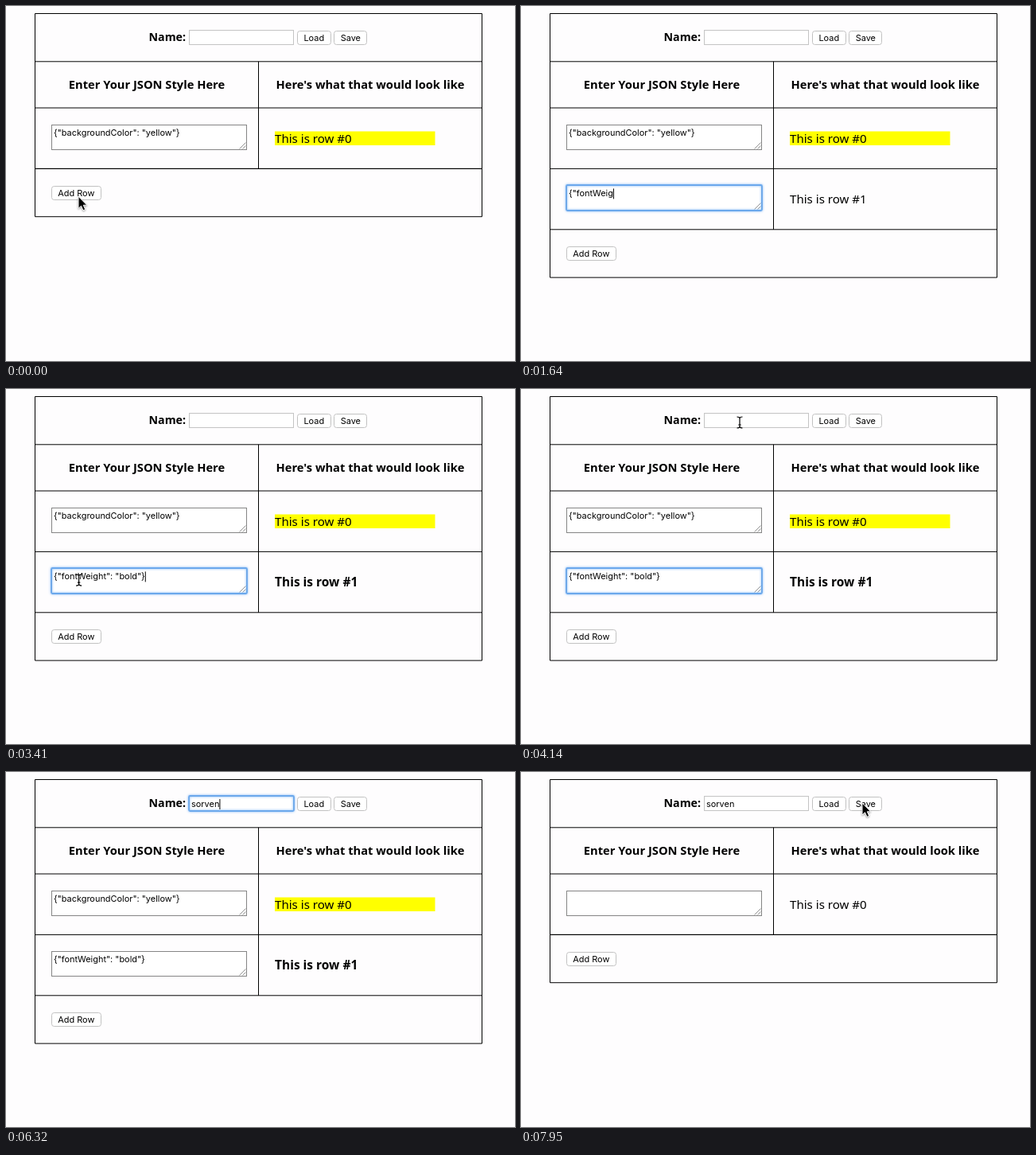
Recreate the animation shown at these times as an HTML page. Size 640x446 px, loop 8000 ms.

```html
<!DOCTYPE html>
<html lang="en">
<head>
<meta charset="utf-8">
<title>JSON style table</title>
<style>
  html, body { margin: 0; width: 100%; height: 100%; overflow: hidden; background: #fefdfe; }
  svg { display: block; width: 640px; height: 446px; }
  text { font: 15.1px "Noto Sans", sans-serif; white-space: pre; }
  .bold { font-size: 15.5px; font-weight: 700; }
  .head { font-size: 14.7px; font-weight: 700; text-anchor: middle; }
  .ui { font: 10.95px Inter, sans-serif; }
  .mid { text-anchor: middle; }
  .line { fill: none; stroke: #000; }
  .area { fill: #fff; stroke: #858585; }
  .field { fill: #fff; stroke: #c4c4c4; }
  .button { fill: #fff; stroke: #c2c2c2; }
  .button.down { fill: #e2e2e2; }
  .grip { fill: none; stroke: #777; stroke-width: .8; }
  .ring { fill: none; stroke: #6ba8ec; stroke-width: 1.8; filter: drop-shadow(0 0 1.5px #7ab4f5); }
  #caret { stroke: #000; }
  #arrow { stroke: #fff; filter: drop-shadow(0 1.5px 1px #0006); }
  #beam path { fill: none; }
</style>
</head>
<body>
<svg viewBox="0 0 640 446">
  <path id="table" class="line"/>

  <text class="head" style="font-size:14.2px; text-anchor:end" x="226" y="44">Name:</text>
  <rect class="field" x="230.5" y="30.5" width="131" height="18"/>
  <rect class="button" x="366.5" y="31.5" width="42" height="17" rx="3"/>
  <text class="ui mid" x="387.3" y="44">Load</text>
  <rect id="save" class="button" x="412.5" y="31.5" width="41" height="17" rx="3"/>
  <text class="ui mid" x="433.3" y="44">Save</text>
  <text id="name" class="ui" x="233" y="44"></text>

  <text class="head" x="177" y="104">Enter Your JSON Style Here</text>
  <text class="head" x="458" y="104">Here's what that would look like</text>

  <rect class="area" x="57.5" y="149.5" width="245" height="31"/>
  <path class="grip" d="M293.5 179.5l8-8m-4 8l4-4"/>
  <text id="style0" class="ui" x="60" y="163.4">{"backgroundColor": "yellow"}</text>
  <rect id="yellow" x="338" y="157.5" width="201.5" height="17.5" fill="#ff0"/>
  <text x="338" y="171.6">This is row #0</text>

  <g id="row1">
    <rect class="area" x="57.5" y="225.5" width="245" height="31"/>
    <path class="grip" d="M293.5 255.5l8-8m-4 8l4-4"/>
    <text id="style1" class="ui" x="60" y="239.4"></text>
    <text id="result1" x="338" y="247.9">This is row #1</text>
  </g>

  <g id="footer">
    <rect id="add" class="button" x="57.5" y="226.5" width="62" height="17" rx="3"/>
    <text class="ui mid" x="88.3" y="239">Add Row</text>
  </g>

  <rect id="areaRing" class="ring" x="57" y="225" width="246" height="32" rx="1.5"/>
  <rect id="nameRing" class="ring" x="230" y="30" width="132" height="19" rx="1.5"/>
  <path id="caret"/>

  <path id="arrow" d="M-.5-1V14.2L3 11 5.5 16.6 8.2 15.4 5.8 10H10.3Z"/>
  <g id="beam">
    <path stroke="#fff" stroke-width="2.4" d="M0-6V6"/>
    <path stroke="#000" stroke-width="1.2" d="M-3.5-7Q0-7 0-5Q0-7 3.5-7M0-5V5M-3.5 7Q0 7 0 5Q0 7 3.5 7M-1.7 3H1.7"/>
  </g>
</svg>
<script>
  const LOOP = 8000;
  const ADD_DOWN = 250, ADDED = 400, AREA_FOCUS = 900, NAME_FOCUS = 4450;
  const SAVE_DOWN = 7440, SAVED = 7580;
  const STYLE = '{"fontWeight": "bold"}', STYLE_START = 1000, STYLE_END = 2300;
  const NAME = 'sorven', NAME_KEYS = [5000, 5200, 5400, 5600, 5780, 5950];
  const TOP = 9.5, BAR = 60.3, HEADER = 58.2, ROW = 76.4;

  const $ = id => document.getElementById(id);
  const show = (id, on) => $(id).style.display = on ? '' : 'none';
  const between = (t, a, b) => t >= a && t < b;
  const clamp = v => Math.min(1, Math.max(0, v));
  const ease = v => v * v * (3 - 2 * v);
  const inside = ([x, y], l, top, r, b) => x >= l && x <= r && y >= top && y <= b;

  function pointer(t) {
    const stops = [[91.5, 240.2], [275, 42], [429.5, 39.8]];
    const [from, to, start, end] = t < 6450
      ? [stops[0], stops[1], 3400, 4140]
      : [stops[1], stops[2], 6450, 6950];
    const k = ease(clamp((t - start) / (end - start)));
    return from.map((v, i) => v + (to[i] - v) * k);
  }

  function drawTable(twoRows) {
    const titles = TOP + BAR, row0 = titles + HEADER, row1 = row0 + ROW;
    const rowEnd = twoRows ? row1 + ROW : row1;
    const rules = [titles, row0, row1, rowEnd].map(y => `M36.5 ${y}H598.5`).join('');
    $('table').setAttribute('d',
      `M36.5 ${TOP}H598.5V${rowEnd + BAR}H36.5Z${rules}M317.5 ${titles}V${rowEnd}`);
    $('footer').setAttribute('transform', `translate(0 ${Math.round(rowEnd - row1)})`);
    show('row1', twoRows);
  }

  function drawCaret(label, since, visible) {
    const on = visible && Math.floor(since / 500) % 2 === 0;
    show('caret', on);
    if (!on) return;
    const x = +label.getAttribute('x') + label.getComputedTextLength() + .5;
    const y = +label.getAttribute('y');
    $('caret').setAttribute('d', `M${x} ${y - 10}V${y + 3}`);
  }

  function drawPointer(t, twoRows) {
    const at = pointer(t);
    const hidden = between(t, STYLE_START, 2500) || between(t, NAME_KEYS[0], 6400);
    const overText = inside(at, 230, 30, 362, 49) || inside(at, 79, 91, 275, 108) ||
      inside(at, 57, 149, 303, 181) || twoRows && inside(at, 57, 225, 303, 257);
    for (const id of ['arrow', 'beam']) {
      $(id).setAttribute('transform', `translate(${at})`);
      show(id, !hidden && (id === 'beam') === overText);
    }
  }

  function draw(t) {
    const twoRows = between(t, ADDED, SAVED), saved = t >= SAVED;
    drawTable(twoRows);
    show('style0', !saved);
    show('yellow', !saved);

    const typed = clamp((t - STYLE_START) / (STYLE_END - STYLE_START));
    $('style1').textContent = STYLE.slice(0, Math.floor(typed * STYLE.length));
    $('result1').classList.toggle('bold', typed === 1);
    const keys = NAME_KEYS.filter(k => k <= t);
    $('name').textContent = NAME.slice(0, keys.length);

    $('add').classList.toggle('down', between(t, ADD_DOWN, ADDED));
    $('save').classList.toggle('down', between(t, SAVE_DOWN, SAVED));

    const inArea = between(t, AREA_FOCUS, NAME_FOCUS);
    const inName = between(t, NAME_FOCUS, SAVE_DOWN);
    show('areaRing', inArea);
    show('nameRing', inName);
    if (inArea) drawCaret($('style1'), Math.max(0, t - STYLE_END), true);
    else drawCaret($('name'), t - (keys.at(-1) ?? NAME_FOCUS), inName);
    drawPointer(t, twoRows);
  }

  function tick() {
    draw(performance.now() % LOOP);
    requestAnimationFrame(tick);
  }
  tick();
</script>
</body>
</html>
```
